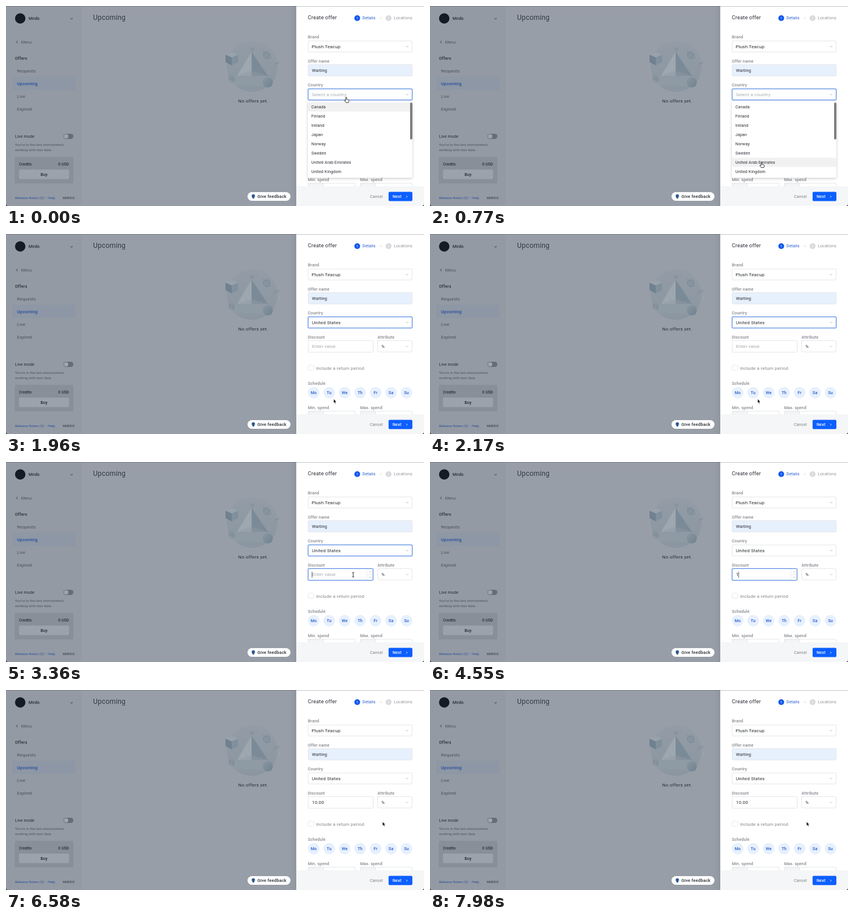
Animation, 720 px wide and 346 px high, one loop 8000 ms. Source, as an HTML page:

```html
<!DOCTYPE html>
<html lang="en">
<head>
<meta charset="utf-8">
<title>Create offer</title>
<style>
html, body { margin: 0; height: 100%; overflow: hidden; background: #989ea7; }
svg { display: block; width: 100vw; height: 100vh; }
text { font-family: Roboto, sans-serif; letter-spacing: .15px; white-space: pre; }
</style>
</head>
<body>
<svg viewBox="0 0 720 346">
  <defs>
    <linearGradient id="edge"><stop offset="0" stop-opacity="0"/><stop offset="1" stop-opacity=".05"/></linearGradient>
    <linearGradient id="disc" x2="0" y2="1"><stop offset="0" stop-color="#939ca6"/><stop offset="1" stop-color="#8a96a1"/></linearGradient>
    <linearGradient id="ball" x2="1" y2="1"><stop offset="0" stop-color="#8a97a3"/><stop offset="1" stop-color="#70818f"/></linearGradient>
    <filter id="shadow" x="-20%" y="-20%" width="140%" height="150%"><feDropShadow dx="0" dy="1.5" stdDeviation="2.5" flood-opacity=".2"/></filter>
    <clipPath id="rows"><rect x="520" y="166.5" width="180" height="128"/></clipPath>
  </defs>
  <g id="page"></g>
  <g id="live"></g>
</svg>
<script>
const DURATION = 8000;
const BLUE = '#2159cb', INK = '#272b32', GREY = '#8f9298', LINE = '#e0e1e4';
const SCROLL = 910, LEAVE = 1190, PICK = 1500, FOCUS = 3290, KEY1 = 4480, KEY2 = 4760, BLUR = 5900;
const countries = ['Canada', 'Finland', 'Ireland', 'Japan', 'Norway', 'Sweden',
  'United Arab Emirates', 'United Kingdom', 'United States'];
// time, x, y of the pointer tip
const track = [[280, 586, 157.5], [770, 571, 270], [LEAVE, 571, 270], [1420, 564.3, 285.5],
  [2450, 564.3, 285.5], [3080, 598, 195], [5300, 598, 195], [5850, 648.6, 228]];

const text = (x, y, s, fill = INK, size = 7, weight = 400, extra = '') =>
  `<text x="${x}" y="${y}" fill="${fill}" font-size="${size}" font-weight="${weight}" ${extra}>${s}</text>`;
const rect = (x, y, w, h, fill, r = 0, extra = '') =>
  `<rect x="${x}" y="${y}" width="${w}" height="${h}" rx="${r}" fill="${fill}" ${extra}/>`;
const circle = (x, y, r, fill, extra = '') => `<circle cx="${x}" cy="${y}" r="${r}" fill="${fill}" ${extra}/>`;
const path = (d, fill, extra = '') => `<path d="${d}" fill="${fill}" ${extra}/>`;
const line = (d, color, w = .8) => path(d, 'none', `stroke="${color}" stroke-width="${w}"`);
const chevron = (x, y, color = '#b0b2b7', r = 2) => line(`M${x - r} ${y - r / 2}l${r} ${r}l${r} ${-r}`, color);
const box = (x, y, w, h, fill = '#fff') => rect(x + .5, y + .5, w - 1, h - 1, fill, 1.5, `stroke="${LINE}" stroke-width=".8"`);
const ring = (x, y, w, h) =>
  rect(x - .3, y - .3, w + .6, h + .6, 'none', 2, 'stroke="#3977ee" stroke-opacity=".2" stroke-width="1.6"') +
  rect(x + .5, y + .5, w - 1, h - 1, 'none', 1.5, 'stroke="#5a8be2"');
const label = (x, y, s) => text(x, y, s, '#82858b', 7, 500, 'style="letter-spacing:.2px"');

function sidebar() {
  const dark = '#242b35', mid = '#4a515b', blue = '#264f9f';
  return rect(0, 0, 130, 346, '#949aa3') +
    circle(24.5, 21.5, 9, '#141b26') + text(39, 24.3, 'Mirdo', dark, 7, 500) + chevron(113, 22, dark) +
    line('M20 60l-2 2.3l2 2.3', dark) + text(26, 65, 'Menu', mid) +
    text(15.5, 93.3, 'Offers', dark, 7, 500, 'style="letter-spacing:.25px"') +
    rect(11, 122.5, 109, 22.5, '#8d97a5', 2) +
    text(19, 114.5, 'Requests', mid, 7.5) + text(19, 136.5, 'Upcoming', blue, 7.5, 500) +
    text(19, 158.5, 'Live', mid, 7.5) + text(19, 180.5, 'Expired', mid, 7.5) +
    text(15.5, 227.8, 'Live mode', dark) +
    rect(99, 221, 17, 9, '#666d77', 4.5) + circle(103.6, 225.5, 3.7, '#9fa5ad') +
    text(15.5, 241.5, "You're in the test environment,", mid, 6) + text(15.5, 250.5, 'working with test data.', mid, 6) +
    rect(15, 261, 101, 46, '#898f99', 2) +
    text(22.5, 276, 'Credits', dark, 6.5, 500) + text(108.5, 276, '0 USD', dark, 6.5, 500, 'text-anchor="end"') +
    rect(22.5, 283, 86, 16.5, '#9ca2ab', 1.5) + text(65.5, 293.8, 'Buy', dark, 7, 500, 'text-anchor="middle"') +
    text(15.5, 333.8, 'Release Notes (3)', blue, 6) + text(67, 333.8, '•', blue, 5) + text(72, 333.8, 'Help', blue, 6) +
    text(98, 333.8, 'MIRDO', mid, 6, 700, 'style="letter-spacing:.3px"');
}

function emptyState() {
  const deep = '#708190', soft = '#81909d';
  return circle(424, 104.5, 44, 'url(#disc)') +
    path('M423 79L398 121H423Z', '#9da7b0') + path('M423 79V121H451Z', '#7b8a97') +
    path('M398 121L423 112L451 121Z', '#8f9ba5', 'opacity=".5"') +
    path('M378 84L389 89V103L378 97Z', deep) + path('M389 89L400 84V97L389 103Z', soft) +
    path('M378 84L389 79.5L400 84L389 89Z', '#98a2ac') +
    path('M391 122H446A9 9 0 0 1 451 138H391Z', '#929da7', 'opacity=".4"') + circle(451, 132, 8.7, 'url(#ball)') +
    circle(424.3, 74.5, 2.2, 'none', `stroke="${deep}" stroke-width=".8"`) +
    circle(449, 85, 6, '#8b98a4', `stroke="${deep}" stroke-width=".7"`) +
    line('M442 78L456 91M444 85l8 6M447 80l8 5', deep, .7) +
    line('M384 123l5-2l4 3v5l-5 2l-4-3ZM384 123l9 6M393 124l-9 4', deep, .7) +
    line('M463 102l2-3l2 1l2-3l2 1', deep) +
    text(400, 167, 'No offers yet.', '#242b35', 8, 400, 'style="letter-spacing:.25px"');
}

function drawer() {
  let s = rect(488, 0, 12, 346, 'url(#edge)') + rect(500, 0, 220, 346, '#fff') +
    text(520, 22.7, 'Create offer', INK, 9, 400, 'style="letter-spacing:.2px"') +
    circle(605, 21, 5, '#1258ee') + text(605, 23.2, '1', '#fff', 6, 400, 'text-anchor="middle"') +
    text(614, 23.3, 'Details', BLUE) + line('M643.5 21h4', '#c4c6ca', .7) +
    circle(659, 21, 5, '#d8d9dc') + text(659, 23.2, '2', '#fff', 6, 400, 'text-anchor="middle"') +
    text(668, 23.3, 'Locations', GREY) +
    label(520, 56, 'Brand') + box(520, 60, 180, 20) + text(526.5, 72.8, 'Plush Teacup', INK, 8) + chevron(691, 70) +
    label(520, 97.5, 'Offer name') + box(520, 101, 180, 20.5, '#e7f0fd') + text(527, 113.5, 'Waiting', INK, 7.5) +
    label(520, 139, 'Country') + box(520, 143, 180, 20) +
    label(520, 180.5, 'Discount') + box(520, 184, 113, 21) +
    label(640, 180.5, 'Attribute') + box(640, 184, 60, 20.5) + text(646.5, 197, '%', INK, 7.5) + chevron(691, 194.5) +
    box(520, 226.5, 10.5, 10) + text(534, 235, 'Include a return period', '#82858b', 8) +
    label(520, 261, 'Schedule');
  ['Mo', 'Tu', 'We', 'Th', 'Fr', 'Sa', 'Su'].forEach((day, i) => {
    const x = 530 + i * 26.65;
    s += circle(x, 274.5, 10, '#e7f0fd') + text(x, 277, day, BLUE, 7, 500, 'text-anchor="middle"');
  });
  [[520, 'Min. spend', 82], [610, 'Max. spend', 90]].forEach(([x, name, w]) => {
    s += label(x, 302.5, name) + box(x, 306, w, 20) + box(x, 306, 27, 20, '#f3f4f5');
  });
  return s;
}

function footer() {
  return rect(500, 312, 220, 34, '#f5f6f7') + text(627, 332, 'Cancel', '#7b7e84') +
    rect(659, 321.5, 41, 16, '#0c5fff', 2) + text(666, 332, 'Next', '#fff', 7, 500) +
    line('M689.5 328l1.7 1.8l-1.7 1.8', '#fff') +
    rect(416, 322, 74, 15, '#fff', 7.5) +
    circle(426, 328.6, 2.8, '#2c568e') + rect(424.5, 330, 3, 3, '#2c568e') +
    text(433, 332, 'Give feedback', INK, 7.5, 500, 'style="letter-spacing:.2px"') +
    rect(0, 0, 720, .7, '#30343a', 0, 'opacity=".4"') +
    path('M0 342Q0 346 4 346H0ZM720 342Q720 346 716 346H720Z', '#30343a');
}

function pointerAt(t) {
  const next = track.findIndex(p => p[0] > t);
  if (next < 1) return (next ? track.at(-1) : track[0]).slice(1);
  const [a, b] = [track[next - 1], track[next]];
  const u = (t - a[0]) / (b[0] - a[0]), k = u * u * (3 - 2 * u);
  return [a[1] + (b[1] - a[1]) * k, a[2] + (b[2] - a[2]) * k];
}

function dropdown(t, y) {
  const scroll = 16 * Math.min(1, Math.max(0, (t - SCROLL) / 70));
  // the highlight only follows once the pointer moves again
  const hover = Math.max(0, Math.min(8, Math.floor((y - 166.5 + (t > LEAVE ? 16 : 0)) / 16)));
  const items = countries.map((name, i) => {
    const top = 166.5 + i * 16 - scroll;
    return (i === hover ? rect(520, top, 180, 16, '#f1f1f2') : '') + text(526, top + 10.5, name);
  }).join('');
  return rect(520, 164.5, 180, 132.5, '#fff', 2, 'filter="url(#shadow)"') +
    `<g clip-path="url(#rows)">${items}</g>` + rect(696, 167 + scroll * 4, 4, 64, '#7f7f80', 2);
}

function discount(t) {
  const value = t < KEY1 ? '' : t < KEY2 ? '1' : t < BLUR ? '10' : '10.00';
  let s = value ? text(527, 197.3, value, INK, 8) : text(527, 197.3, 'Enter value', '#a6a8ac', 8);
  if (t < FOCUS || t >= BLUR) return s;
  const since = t - (t < KEY1 ? FOCUS : t < KEY2 ? KEY1 : KEY2);
  if (since % 1000 < 500) s += rect(526.7 + value.length * 4.65, 190, .8, 10, INK);
  return s + line('M621.5 185v19M621.5 194.5h11', LINE, .7) +
    line('M625.7 190.8l1.3-1.3l1.3 1.3M625.7 198.8l1.3 1.3l1.3-1.3', GREY, .7) + ring(520, 184, 112.5, 21);
}

function pointer(t, x, y) {
  if (t > KEY1 - 70 && t < 5300) return '';
  let shape;
  if (t < PICK)
    shape = path('M-.8 .5Q0-.5 .8 .5V4L4 4.8Q5 5.2 4.7 7L4 9.5H-.5L-3 6Q-2.6 4.8-.8 6Z', '#fff', 'stroke="#111" stroke-width=".8"');
  else if (x > 520 && x < 632 && y > 184 && y < 205)
    shape = line('M-1.7-4Q0-4 0-3V3Q0 4-1.7 4M1.7-4Q0-4 0-3M0 3Q0 4 1.7 4', '#111', .9);
  else
    shape = path('M0 0V7L1.6 5.5L2.7 8L4 7.4L2.9 5H5Z', '#000', 'stroke="#fff" stroke-width=".6"');
  return `<g transform="translate(${x} ${y})">${shape}</g>`;
}

const page = document.getElementById('page'), live = document.getElementById('live');
page.innerHTML = rect(0, 0, 720, 346, '#989ea7') + sidebar() +
  text(150, 24, 'Upcoming', '#333a44', 12, 400, 'style="letter-spacing:.2px"') +
  emptyState() + drawer() + footer();

function render(now) {
  const t = now % DURATION, [x, y] = pointerAt(t), open = t < PICK;
  live.innerHTML =
    text(527, 155.8, open ? 'Select a country' : 'United States', open ? '#a6a8ac' : INK, 8) + chevron(691, 153) +
    (t < 3500 ? ring(520, 143, 180, 20) : '') +
    discount(t) + (open ? dropdown(t, y) : '') + pointer(t, x, y);
  requestAnimationFrame(render);
}
requestAnimationFrame(render);
</script>
</body>
</html>
```
